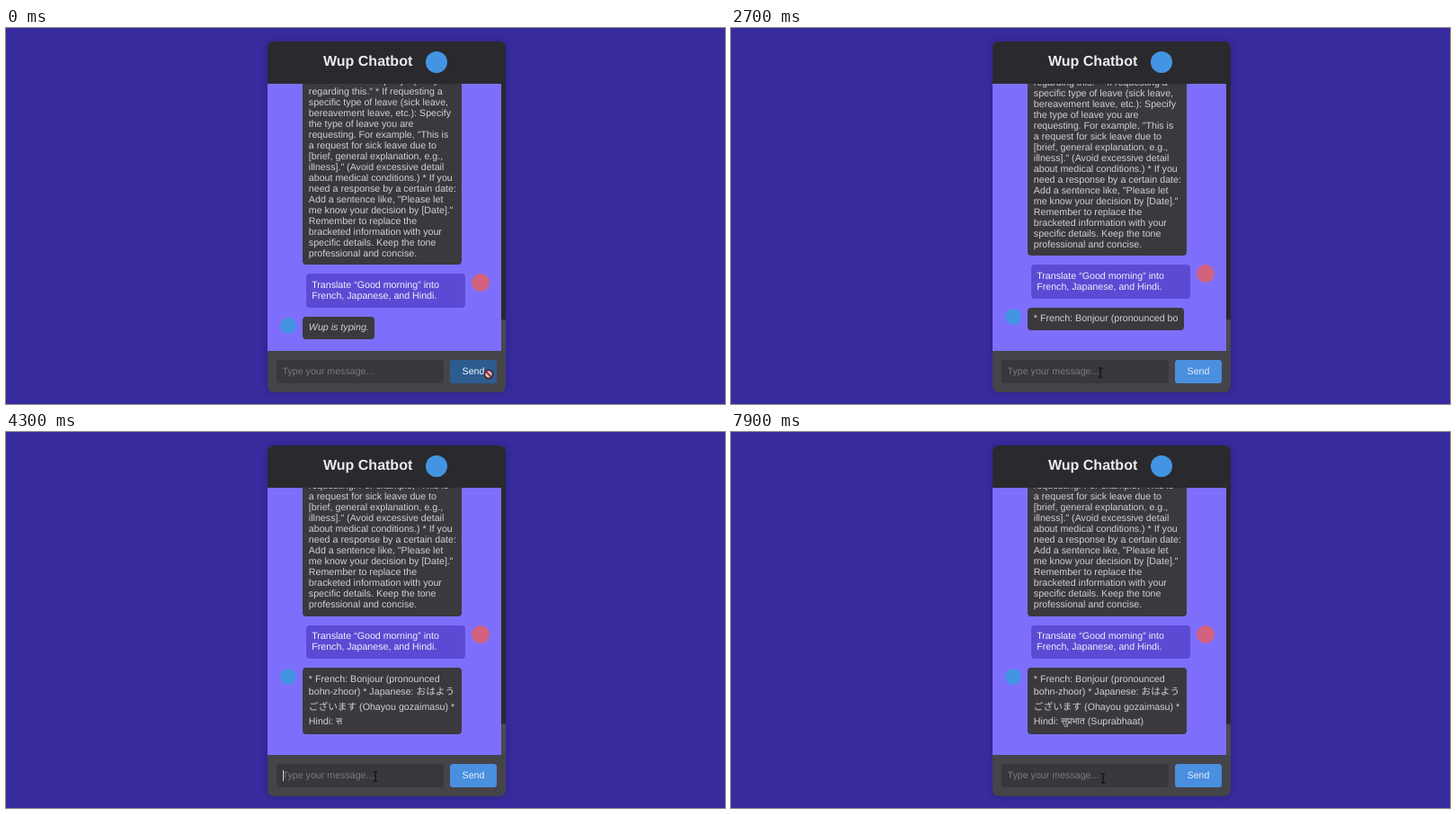
An HTML page that plays this animation: 800x418 px, repeating every 8 s.

```html
<!DOCTYPE html>
<html lang="en">
<head>
<meta charset="utf-8">
<title>Chat</title>
<style>
* { box-sizing: border-box; }
html, body { margin: 0; width: 100%; height: 100%; overflow: hidden; background: #372b9e; }
body {
  position: relative;
  font: 10.667px/12px "Liberation Sans", "Noto Sans CJK JP", "Noto Sans", Arial, sans-serif;
  text-rendering: geometricPrecision;
  white-space: nowrap;
  cursor: default;
}
.chat {
  position: absolute; left: 290.5px; top: 14.5px; width: 265.5px; height: 390.5px;
  border-radius: 7px; overflow: hidden; background: #454449;
}
.glow {
  position: absolute; left: 290.5px; top: 14.5px; width: 265.5px; height: 390.5px;
  border-radius: 7px; box-shadow: 0 0 7px rgba(20, 15, 60, .3);
}
.stage { position: absolute; left: -290.5px; top: -14.5px; width: 800px; height: 418px; }
.stage > * { position: absolute; }
header { left: 290px; top: 14px; width: 267px; height: 47.5px; background: #2a292d; }
h1 {
  position: absolute; left: 63px; top: 15px; margin: 0;
  font-size: 16px; line-height: 18px; color: #ececee;
}
.dot { border-radius: 50%; background: #4395e3; }
header .dot { position: absolute; left: 177px; top: 11.5px; width: 24px; height: 24px; }

.log { left: 290px; top: 61.5px; width: 261px; height: 297px; overflow: hidden; background: #7d6ffb; }
.rows { position: absolute; left: 0; width: 261px; }
.row { position: relative; min-height: 20px; margin-top: 10px; }
.row .dot { position: absolute; left: 14.5px; top: 1px; width: 18px; height: 18px; }
.row .me { left: 227.5px; top: 0; width: 20px; height: 20px; background: #d3627f; }
.bubble {
  width: fit-content; margin-left: 40.2px; padding: 6.667px;
  border-radius: 4px; background: #3b393d; color: #d2d1d4;
}
.full { width: 177px; }
.mine { width: 177px; margin-left: 43.5px; background: #5b4bd4; color: #f1f0fb; }
.typing { font-style: italic; }

.track { left: 551px; top: 61.5px; width: 5px; height: 297px; background: #2a292d; }
.thumb { left: 551px; top: 324px; width: 5px; height: 34.5px; background: #4b4a4f; border-radius: 2px 2px 0 0; }
.input {
  left: 301px; top: 369px; width: 186px; height: 26px; padding: 7px 6.5px;
  border-radius: 3.5px; background: #38373b; color: #7b7a7e;
}
.caret { left: 307.5px; top: 376px; width: 1px; height: 12px; background: #d6d6d8; }
.send {
  left: 494px; top: 368.5px; width: 52px; height: 26.5px; line-height: 26.5px;
  border-radius: 3.5px; text-align: center; background: #4a8fe0; color: #e4eefa;
}
.send.off { background: #2d5c8f; color: #f4f7fa; }
svg { left: 0; top: 0; width: 20px; height: 20px; margin: -10px; overflow: visible; }
</style>
</head>
<body>
<div class="glow"></div>
<div class="chat"><div class="stage">
  <div class="log"><div class="rows" id="rows">
    <div class="row"><div class="bubble full">reviewed the company's policy<br>regarding this." * If requesting a<br>specific type of leave (sick leave,<br>bereavement leave, etc.): Specify<br>the type of leave you are<br>requesting. For example, "This is<br>a request for sick leave due to<br>[brief, general explanation, e.g.,<br>illness]." (Avoid excessive detail<br>about medical conditions.) * If you<br>need a response by a certain date:<br>Add a sentence like, "Please let<br>me know your decision by [Date]."<br>Remember to replace the<br>bracketed information with your<br>specific details. Keep the tone<br>professional and concise.</div></div>
    <div class="row"><div class="bubble mine">Translate “Good morning” into<br>French, Japanese, and Hindi.</div><div class="dot me"></div></div>
    <div class="row"><div class="dot"></div><div class="bubble" id="reply"></div></div>
  </div></div>
  <div class="track"></div>
  <div class="thumb"></div>
  <header><h1>Wup Chatbot</h1><div class="dot"></div></header>
  <div class="input">Type your message...</div>
  <div class="caret" id="caret"></div>
  <div class="send" id="send">Send</div>
  <svg id="cursor" viewBox="-10 -10 20 20">
    <g id="denied"><circle r="4.6" fill="#e3c9c6" stroke="#4b2631" stroke-width="1.8"/><path d="M-3-3L3 3" stroke="#8e2f35" stroke-width="1.9"/></g>
    <path id="arrow" d="M0 0V10.5L2.5 8.2L4.2 12L5.8 11.3L4.1 7.6H7.5Z" fill="#fff" stroke="#111" stroke-width=".7"/>
    <path id="beam" d="M-2.3-5H-.6L0-4.4L.6-5H2.3M0-4.4V4.6M-2.3 5.2H-.6L0 4.6L.6 5.2H2.3" fill="none" stroke="#0c0c0e" stroke-width="1.1"/>
  </svg>
</div></div>
<script>
const LOOP = 8000, STEP = 100, ANSWER = 1900, BLINK = 530;
const WRAP = 33; // the first word too wide for line one drops at this count

// Lines with Japanese or Hindi glyphs are taller and sit lower.
const LINES = [
  { text: "* French: Bonjour (pronounced ", tall: 12, drop: 0 },
  { text: "bohn-zhoor) * Japanese: おはよう", tall: 17.33, drop: 2 },
  { text: "ございます (Ohayou gozaimasu) * ", tall: 17.33, drop: 2 },
  { text: "Hindi: सुप्रभात (Suprabhaat)", tall: 14, drop: 1 }
];
const ALL = LINES.map(l => l.text).join("");
const TYPED = [[1900, 0], [2700, 32], [3500, 61], [4300, 93], [4820, ALL.length]];
const MOVE_X = [[800, 537], [900, 531], [1000, 495], [1100, 432], [1200, 411], [7400, 411], [7900, 414]];
const MOVE_Y = [[800, 385], [1200, 383], [7400, 383], [7900, 385]];

const $ = id => document.getElementById(id);
const show = (el, on) => { el.style.display = on ? "" : "none"; };

function at(keys, t) {
  if (t <= keys[0][0]) return keys[0][1];
  for (let i = 1; i < keys.length; i++) {
    const [t0, v0] = keys[i - 1], [t1, v1] = keys[i];
    if (t <= t1) return v0 + (v1 - v0) * (t - t0) / (t1 - t0);
  }
  return keys[keys.length - 1][1];
}

function addLine(box, text, height, drop) {
  const line = document.createElement("div");
  line.textContent = text;
  line.style.height = height + "px";
  line.style.paddingTop = drop + "px";
  box.append(line);
}

function drawReply(t) {
  const box = $("reply"), waiting = t < ANSWER;
  const n = Math.floor(at(TYPED, t) + 0.001);
  box.textContent = "";
  box.classList.toggle("typing", waiting);
  box.classList.toggle("full", !waiting && n >= WRAP);
  if (waiting) return addLine(box, "Wup is typing.", 12, 0);
  if (n < WRAP) {
    if (n) addLine(box, ALL.slice(0, n), 12, 0);
    return;
  }
  let left = n;
  for (const { text, tall, drop } of LINES) {
    if (left <= 0) break;
    const part = text.slice(0, left);
    const wide = /[^\x00-\x7f]/.test(part);
    addLine(box, part, wide ? tall : 12, wide ? drop : 0);
    left -= text.length;
  }
}

function draw(t) {
  const ready = t >= ANSWER;
  drawReply(t);
  $("rows").style.bottom = (ready ? 22.5 : 12.5) + "px";
  $("send").classList.toggle("off", !ready);
  show($("caret"), ready && Math.floor((t - ANSWER) / BLINK) % 2 === 0);

  const x = at(MOVE_X, t), y = at(MOVE_Y, t), overSend = x > 494;
  $("cursor").style.transform = `translate(${x}px, ${y}px)`;
  show($("denied"), overSend);
  show($("arrow"), !overSend && !ready);
  show($("beam"), ready);
}

let start, last = -1;
function frame(now) {
  start ??= now;
  const t = Math.floor((now - start) % LOOP / STEP) * STEP;
  if (t !== last) draw(last = t);
  requestAnimationFrame(frame);
}
draw(0);
requestAnimationFrame(frame);
</script>
</body>
</html>
```
